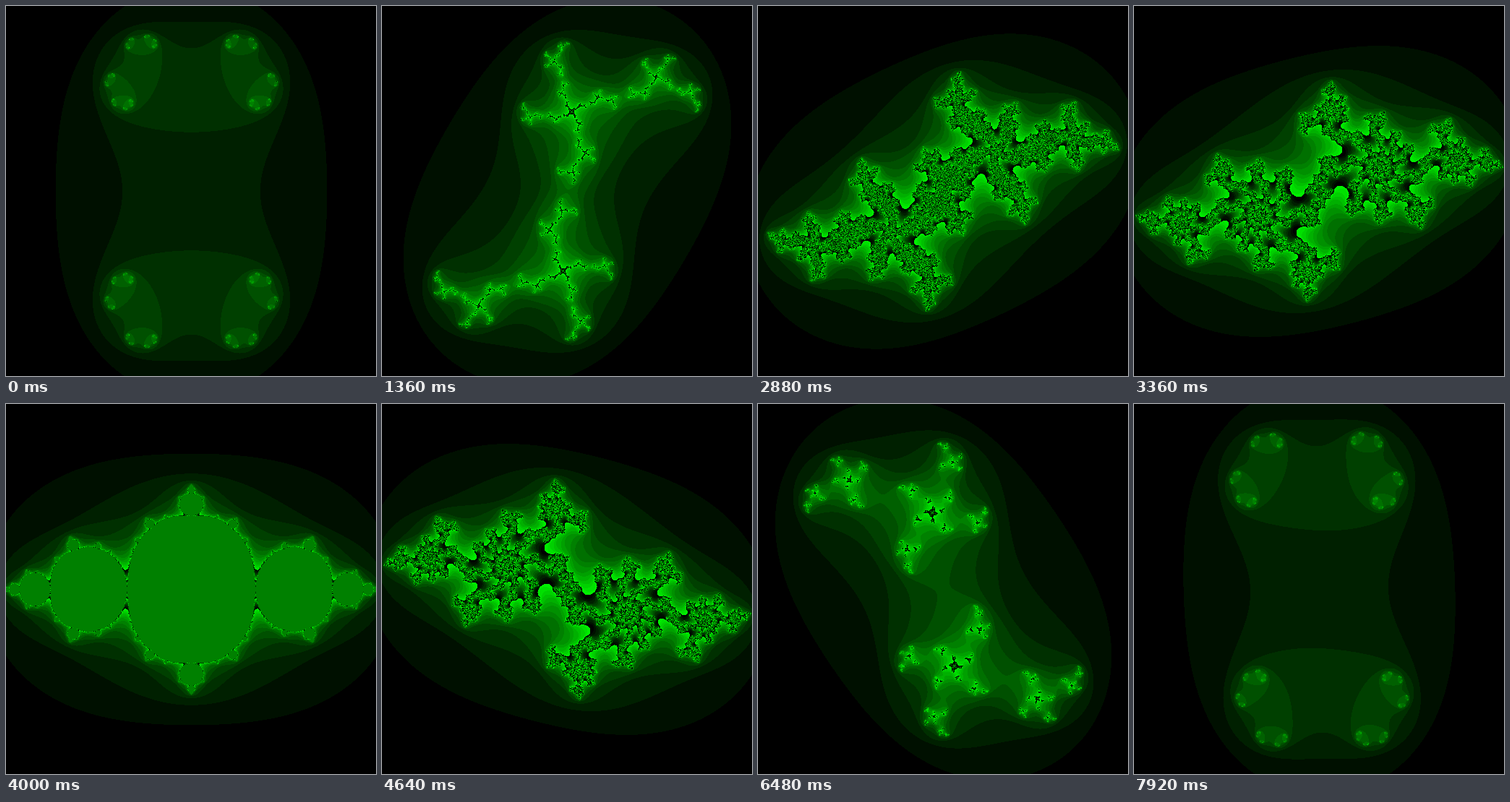
Recreate the animation shown at these times as an HTML page with a canvas. Size 512 by 512 pixels, loop 8000 ms.

```html
<!DOCTYPE html>
<html lang="en">
<head>
<meta charset="utf-8">
<title>Julia set</title>
<style>
  html, body { margin: 0; width: 100%; height: 100%; overflow: hidden; background: #000; }
  canvas { display: block; width: 512px; height: 512px; }
</style>
</head>
<body>
<canvas id="stage" width="512" height="512"></canvas>
<script>
const SIZE = 512, HALF = SIZE / 2, SPAN = 3;
const STEPS = 100, STEP_MS = 80;
const RADIUS = 0.7885, MAX_ITER = 200;

const ctx = document.getElementById('stage').getContext('2d');
const image = ctx.createImageData(SIZE, SIZE);
const pixels = new Uint32Array(image.data.buffer);

function escapeTime(x, y, cx, cy) {
  for (let n = 0; n < MAX_ITER; n++) {
    const nx = x * x - y * y + cx;
    y = 2 * x * y + cy;
    x = nx;
    if (x * x + y * y > 4) return n;
  }
  return MAX_ITER;
}

function plot(x, y, color) {
  if (x < SIZE && y < SIZE) pixels[y * SIZE + x] = color;
}

function draw(step) {
  const angle = 2 * Math.PI * step / STEPS;
  const cx = RADIUS * Math.cos(angle), cy = RADIUS * Math.sin(angle);
  const unit = SPAN / SIZE;
  // z and -z share a colour, so the upper half gives the lower one
  for (let y = 0; y <= HALF; y++) {
    for (let x = 0; x <= SIZE; x++) {
      const n = escapeTime((x - HALF) * unit, (y - HALF) * unit, cx, cy);
      const green = n * 16 & 255;
      const color = (0xff000000 | green << 8) >>> 0;
      plot(x, y, color);
      plot(SIZE - x, SIZE - y, color);
    }
  }
  ctx.putImageData(image, 0, 0);
}

let shown = -1;
function tick(now) {
  const step = Math.floor(now / STEP_MS) % STEPS;
  if (step !== shown) draw(shown = step);
  requestAnimationFrame(tick);
}
tick(0);
</script>
</body>
</html>
```
